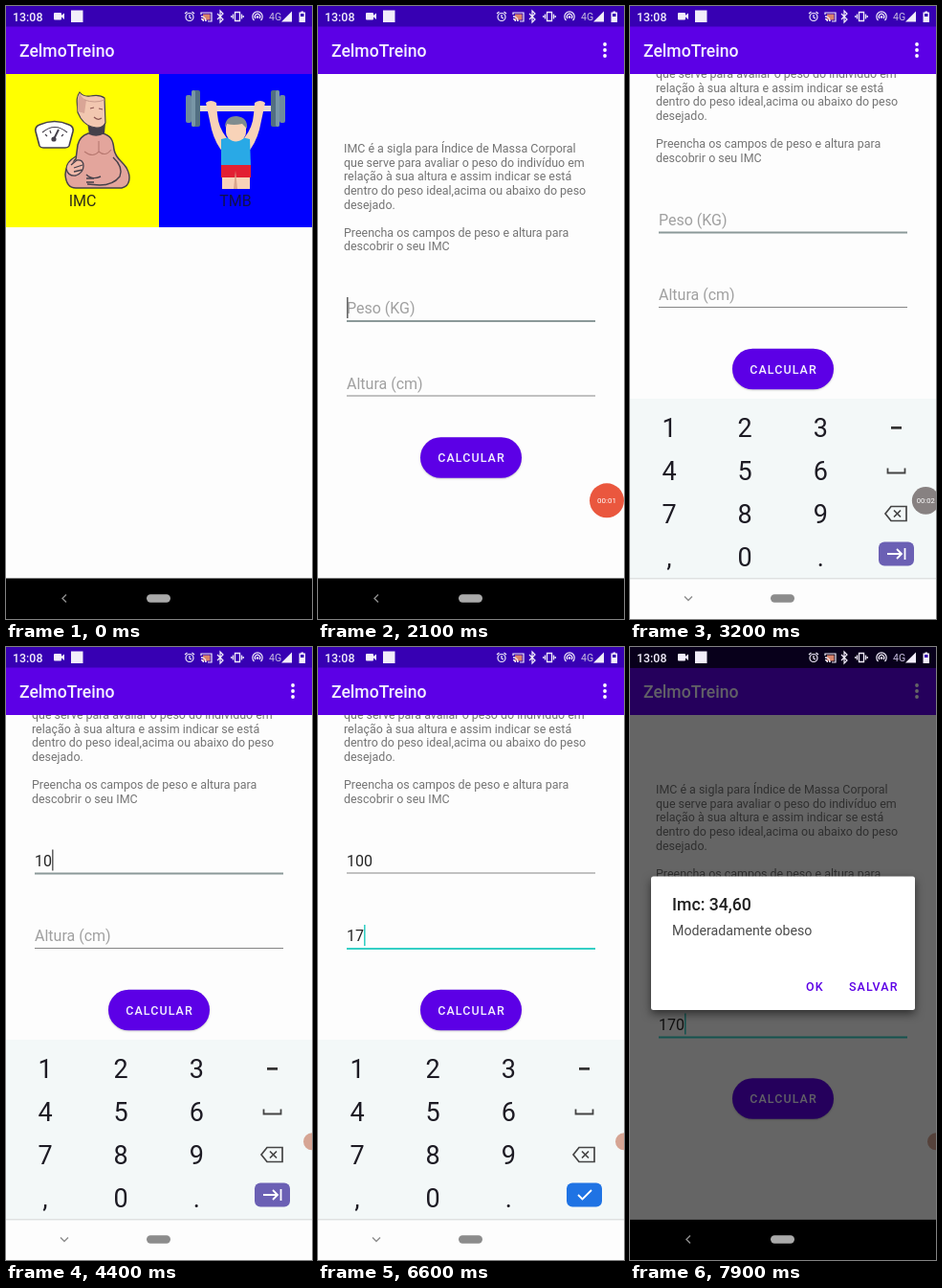
Write an HTML page with a canvas that moves like this. It is 320x640 px and loops after 8000 ms.

```html
<!DOCTYPE html>
<html lang="pt">
<head>
<meta charset="utf-8">
<style>
html, body { margin: 0; width: 100%; height: 100%; overflow: hidden; background: #000; }
canvas { display: block; width: 320px; height: 640px; }
</style>
</head>
<body>
<canvas id="stage" width="320" height="640"></canvas>
<script>
const c = document.getElementById('stage').getContext('2d');
const LOOP = 8000, SCROLL = 92.5, NAV_TOP = 597.5;
const PURPLE = '#5c00e6', DARK_PURPLE = '#3700b3', PAPER = '#fdfdfd', INK = '#45404a', SKIN = '#f8d3b8', TEAL = '#35cfc5';
const INTRO = [
  'IMC é a sigla para Índice de Massa Corporal',
  'que serve para avaliar o peso do indivíduo em',
  'relação à sua altura e assim indicar se está',
  'dentro do peso ideal,acima ou abaixo do peso',
  'desejado.', '',
  'Preencha os campos de peso e altura para',
  'descobrir o seu IMC'
];
const FIELDS = [
  { hint: 'Peso (KG)', value: '100', y: 321, typed: [3700, 4200, 4700], focus: [1900, 5200], accent: '#8b9999', caret: '#666' },
  { hint: 'Altura (cm)', value: '170', y: 399.5, typed: [6100, 6500, 6900], focus: [5200, LOOP], accent: TEAL, caret: TEAL }
];
const CARET_RESETS = [1900, 2600, 5200, ...FIELDS[0].typed, ...FIELDS[1].typed];

const clamp = x => Math.max(0, Math.min(1, x));
const span = (t, a, b) => clamp((t - a) / (b - a));
const easeOut = u => 1 - (1 - u) ** 3;
const mix = (a, b, u) => a + (b - a) * u;

function rect(x, y, w, h, fill, r = 0) {
  c.beginPath();
  c.roundRect(x, y, w, h, r);
  c.fillStyle = fill;
  c.fill();
}
function circle(x, y, r, fill) {
  c.beginPath();
  c.arc(x, y, r, 0, 7);
  c.fillStyle = fill;
  c.fill();
}
function path(d, fill, stroke, width = 1) {
  const p = new Path2D(d);
  if (fill) { c.fillStyle = fill; c.fill(p); }
  if (stroke) { c.strokeStyle = stroke; c.lineWidth = width; c.stroke(p); }
}
function text(s, x, y, size, fill, { weight = 400, align = 'left', spacing = 0 } = {}) {
  c.font = `${weight} ${size}px Roboto, sans-serif`;
  c.textAlign = align;
  c.letterSpacing = spacing + 'px';
  c.fillStyle = fill;
  c.fillText(s, x, y);
}
function layer(draw, { alpha = 1, scale = 1, cy = 320 } = {}) {
  c.save();
  c.globalAlpha = alpha;
  c.translate(160, cy);
  c.scale(scale, scale);
  c.translate(-160, -cy);
  draw();
  c.restore();
}

function page() {
  rect(0, 0, 320, 640, '#000');
  rect(0, 71, 320, NAV_TOP - 71, PAPER);
}
function appBar() {
  rect(0, 0, 320, 22, DARK_PURPLE);
  rect(0, 21.4, 320, 49.6, PURPLE);
  text('ZelmoTreino', 14, 53, 17.6, '#f4f0ff', { weight: 500 });
}

function bellyMan() {
  path('M35 124Q51 117 66 124Q71 126 70 131L66 146Q65 148 62 148H39Q36 148 35 146L31 131Q30 126 35 124Z', '#fff', INK, 1.6);
  path('M38 132Q51 121 64 132M41 134L43 136M46 130L47 133M60 134L58 136', null, INK, 1.2);
  path('M50 139L55 129', null, INK, 2);
  circle(50, 139, 2.6, INK);
  path('M86 133Q77 136 75 145L73 160Q62 166 62 176Q63 190 73 190H121C130 188 131 178 126 169C121 161 115 160 113 150C112 139 109 135 101 133Z', '#e3a59c', INK, 1.5);
  path('M85 122L87 134Q95 138 103 133L104 122Z', INK);
  path('M75 111C75 103 72 97 77 90Q81 95 88 94Q98 92 103 96L104 122Q101 128 94 127Q84 126 78 117Z', '#f2c7b0', INK, 1.2);
  path('M75 110Q74 100 77 91Q80 97 84 98L82 112Z', '#d9a596');
  path('M82 98Q93 102 103 98', null, '#c99a8c', 1);
  path('M88 107L92 106M97 107L101 108M92 116Q96 120 100 117', null, '#8b5550', 1.2);
  path('M73 157Q63 163 63 170Q65 178 73 177Q81 174 81 167Q81 160 74 161L68 166M80 171L71 173M80 166L71 169', '#f0b9a9', INK, 1.3);
  path('M112 158Q123 168 119 178Q112 187 98 187L85 186M84 176Q90 182 99 178M84 180H92M84 184H92', null, INK, 1.4);
  path('M82 152Q91 159 97 152Q104 158 110 150M97 141V153', null, '#b77870', 1.1);
}

function lifter() {
  const half = () => {
    rect(188, 93, 6, 29, '#6f8b9d', 2);
    rect(194, 88, 9, 38, '#526f82', 2);
    rect(194, 88, 4, 38, '#7896a6', 2);
    path('M209 101Q214 97 220 101L221 113Q222 127 231 138L228 154Q219 144 215 129Z', SKIN);
  };
  rect(202, 104, 76, 6, '#e8dcd4');
  half();
  c.save();
  c.translate(480, 0);
  c.scale(-1, 1);
  half();
  c.restore();
  rect(226, 178, 29, 13, SKIN);
  path('M225 139Q240 134 255 139L256 167H225Z', '#29a9e6');
  path('M233 137Q240 146 248 137Z', SKIN);
  rect(225, 166, 31, 13, '#e21f32');
  path('M240 172L238 191H242Z', '#d9a68c');
  rect(230, 118, 21, 23, SKIN, 9);
  path('M229 127Q229 115 241 115Q253 116 252 128L247 123Q238 125 231 123Z', '#7f8c8e');
}

function home() {
  page();
  appBar();
  rect(0, 71, 160, 160, '#ff0');
  rect(160, 71, 160, 160, '#00f');
  bellyMan();
  lifter();
  text('IMC', 80, 209, 16, '#2c2c18', { align: 'center' });
  text('TMB', 240, 209, 16, '#10104c', { align: 'center' });
}

function field(f, t) {
  const count = f.typed.filter(at => t >= at).length;
  const focused = t >= f.focus[0] && t < f.focus[1];
  const value = f.value.slice(0, count);
  text(value || f.hint, 30, f.y, 16, value ? '#252525' : '#a0a0a0');
  rect(30, f.y + 7, 260, focused ? 2 : 1, focused ? f.accent : '#858585');
  const reset = Math.max(...CARET_RESETS.filter(at => at <= t));
  if (focused && (t - reset) % 1000 < 500) {
    rect(30 + (value ? c.measureText(value).width : 0), f.y - 17, 1.6, 22, f.caret);
  }
}

function form(t) {
  page();
  c.save();
  c.translate(0, t < 7560 ? -SCROLL * easeOut(span(t, 2500, 2700)) : 0);
  INTRO.forEach((line, i) => text(line, 27, 153.3 + i * 14.55, 12.44, '#747474'));
  FIELDS.forEach(f => field(f, t));
  c.save();
  c.shadowColor = '#0003';
  c.shadowBlur = 2;
  c.shadowOffsetY = 1;
  rect(107, 450.2, 106, 42.6, PURPLE, 21.3);
  c.restore();
  text('CALCULAR', 160.5, 476, 12.44, '#f4f0ff', { weight: 500, align: 'center', spacing: 1.1 });
  c.restore();
  appBar();
  [40, 46, 52].forEach(y => circle(300, y, 1.9, '#fff'));
}

function keyboard(t, offset) {
  c.save();
  c.beginPath();
  c.rect(0, 410, 320, NAV_TOP - 410);
  c.clip();
  c.translate(0, offset);
  rect(0, 410, 320, 230, '#f3f8f8');
  ['123', '456', '789', ',0.'].forEach((row, r) => [...row].forEach((key, i) =>
    text(key, 41 + i * 79.2, 450 + r * 45, 27, '#1d1b24', { align: 'center' })));
  rect(273, 439, 11, 2.8, '#333');
  path('M269.5 482.5V487.5H287.5V482.5', null, '#444', 1.8);
  path('M273 522.5H289V537.5H273L267 530ZM276 526.5L283 533.5M283 526.5L276 533.5', null, '#444', 1.7);
  const done = t >= 5200;
  rect(260, 559.5, 37, 25, done ? '#1f73e4' : '#6b60b4', 6);
  path(done ? 'M272 572L276.5 576.5L286 567' : 'M269 572H284M279 567L284 572L279 577M287.5 566V578', null, '#fff', 1.8);
  c.restore();
}

function dialog() {
  c.save();
  c.shadowColor = '#0008';
  c.shadowBlur = 10;
  c.shadowOffsetY = 4;
  rect(22, 239.5, 276, 139.5, '#fff', 2.5);
  c.restore();
  text('Imc: 34,60', 44, 274.5, 17.7, '#202020', { weight: 500 });
  text('Moderadamente obeso', 44, 301, 14.2, '#4c4c4c');
  text('OK', 184, 359, 12.44, PURPLE, { weight: 500, spacing: 1.1 });
  text('SALVAR', 229, 359, 12.44, PURPLE, { weight: 500, spacing: 1.1 });
}

function statusIcons() {
  const w = '#f2eefa';
  text('13:08', 7, 15.5, 12.4, w, { weight: 500 });
  rect(50, 7, 8, 7.5, w, 1);
  path('M57 10.5L61 7.5V14Z', w);
  rect(68, 4.5, 12.5, 12.5, w);
  path('M196 11.5A4 4 0 1 1 188 11.5A4 4 0 1 1 196 11.5M192 9V12L194 13M187 8L189.5 6M197 8L194.5 6', null, w, 1.2);
  path('M204 9V7H215V16H211M204 11Q209 11 209 16M204 13.5Q206.5 13.5 206.5 16', null, w, 1.2);
  rect(206, 8.5, 7.5, 6, '#d8836a');
  path('M204 11Q209 11 209 16M204 13.5Q206.5 13.5 206.5 16', null, w, 1.2);
  path('M221 8L227 14L224 17V5L227 8L221 14', null, w, 1.2);
  path('M239.5 6.5H244.5V15.5H239.5ZM237.5 8.5V13.5M246.5 8.5V13.5M235.8 10V12M248.2 10V12', null, w, 1.3);
  path('M259.5 15A5.2 5.2 0 1 1 266.5 15M261 13A2.8 2.8 0 1 1 265 13', null, w, 1.2);
  circle(263, 11.5, 1.3, w);
  text('4G', 275, 15, 10.5, '#c9bfe0');
  path('M288 16.5H299V5.5Z', w);
  path('M306.5 6.5H308.5V5.5H311V6.5H313V17H306.5Z', w);
  rect(308, 8, 3.5, 3, DARK_PURPLE);
}

function navIcons(keys) {
  const turning = keys > 0 && keys < 1;
  c.save();
  c.globalAlpha = turning ? .5 : 1;
  c.translate(61, 618.5);
  c.rotate(-Math.PI / 2 * keys);
  path('M2 -4L-2 0L2 4', null, '#8d8d8d', 1.4);
  c.restore();
  rect(147, 614.3, 25, 8.5, turning ? '#c6c8c6' : keys ? '#8c8c8c' : '#aaa', 4.2);
}

function bubble(t) {
  if (t < 300) return;
  const u = span(t, 3000, 3500);
  const seconds = t < 1600 ? 0 : t < 2600 ? 1 : 2;
  const tone = u === 0 ? '#ea573e' : u < .7 ? '#878181' : '#d6a594';
  c.save();
  c.globalAlpha = span(t, 300, 450);
  circle(mix(302, 320, u), 516.3, mix(18, 9, u), tone);
  if (u < .7) text('00:0' + seconds, mix(302, 320, u), 519.3, mix(8, 7, u), '#fff', { align: 'center' });
  c.restore();
}

function draw(t) {
  const open = span(t, 750, 1250), eased = easeOut(open);
  if (open < 1) {
    layer(home, { scale: mix(1, 1.046, eased) });
    rect(0, 0, 320, 640, `rgba(0,0,0,${.17 * eased})`);
  }
  if (open > 0) layer(() => form(t), { alpha: clamp(open * 4), scale: mix(.85, 1, eased) });

  const shown = easeOut(span(t, 2400, 2700)), hidden = span(t, 7460, 7730);
  if (shown > 0 && hidden < 1) keyboard(t, 188 * (1 - shown + hidden ** 2));
  const light = span(t, 2400, 2600) * (1 - span(t, 7485, 7685));
  if (light > 0) {
    rect(0, NAV_TOP, 320, 42.5, `rgba(253,253,253,${light})`);
    rect(0, NAV_TOP, 320, 1, `rgba(225,230,230,${light})`);
  }

  bubble(t);
  const pop = span(t, 7700, 7880);
  if (pop > 0) {
    rect(0, 0, 320, 22, `rgba(0,0,0,${.85 * pop})`);
    rect(0, 22, 320, NAV_TOP - 22, `rgba(0,0,0,${.6 * pop})`);
    layer(dialog, { alpha: pop, scale: mix(.9, 1, easeOut(pop)), cy: 309 });
  }
  statusIcons();
  navIcons(span(t, 2400, 2500) - span(t, 7450, 7550));
}

const start = performance.now();
function tick() {
  draw((performance.now() - start) % LOOP);
  requestAnimationFrame(tick);
}
tick();
</script>
</body>
</html>
```
